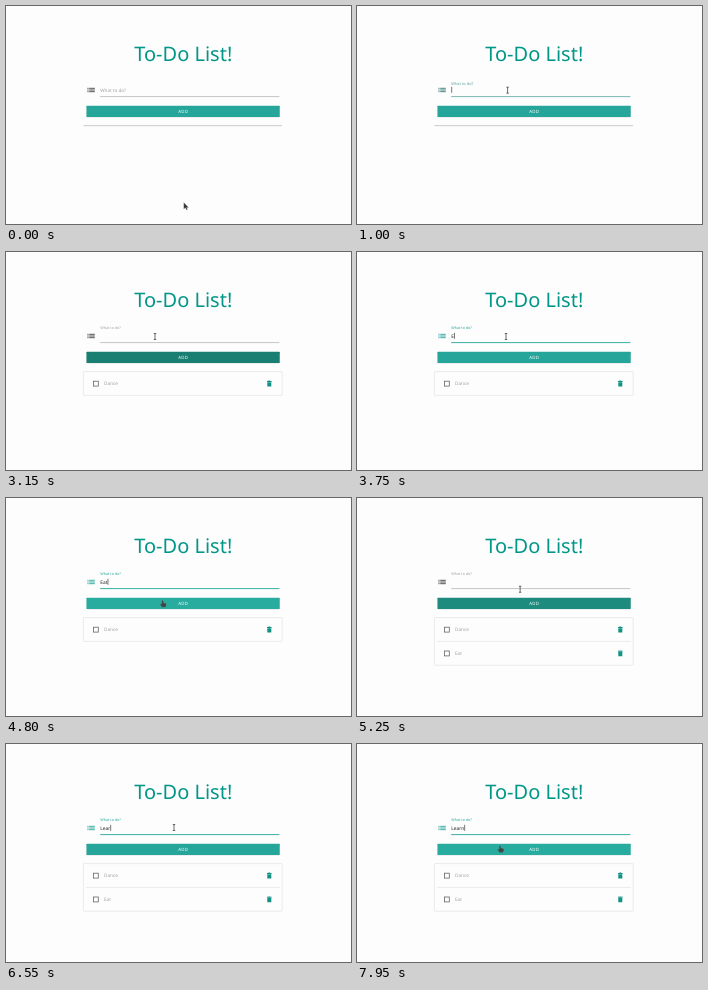
Recreate the animation shown at these times as an HTML page. Size 345 px wide and 218 px high, loop 8000 ms.

```html
<!DOCTYPE html>
<html lang="en">
<head>
<meta charset="utf-8">
<title>To-Do List</title>
<style>
  html, body { margin: 0; width: 100%; height: 100%; overflow: hidden; background: #fdfdfd; }
  svg { display: block; width: 100vw; height: 100vh; }
  text { font-family: "Noto Sans", "Open Sans", sans-serif; font-size: 4.7px; text-rendering: geometricPrecision; white-space: pre; }
</style>
</head>
<body>
<svg viewBox="0 0 345 218">
  <text x="177.3" y="55" text-anchor="middle" fill="#009688" style="font-size:20px">To-Do List!</text>

  <path id="icon" d="M81.4 82.3h7.4m-7.4 1.7h7.4m-7.4 1.7h7.4" stroke-width=".9" stroke-dasharray="1.2 .6 9"/>
  <text id="label" style="font-size:4.6px">What to do?</text>
  <text id="entry" x="94.3" y="85.8" fill="#222" style="font-size:4.85px"></text>
  <rect id="caret" y="80.8" width=".6" height="6" fill="#222"/>
  <path id="line" d="M94.2 90.6H273.4"/>

  <rect x="80.4" y="100" width="193.4" height="11.6" rx="1" opacity=".12"/>
  <rect id="button" x="80.5" y="99.7" width="193.2" height="11.3" rx=".6"/>
  <text x="177.2" y="106.9" text-anchor="middle" fill="#fff" style="font-size:4.4px;letter-spacing:.16px">ADD</text>

  <rect id="list" x="77.4" y="119.6" width="198.8" rx=".4" fill="none" stroke-width=".75"/>
  <g id="items"></g>

  <g id="pointer">
    <path id="arrow" d="M.3 0V6.6L2 5.2 3 7.4 4 7 3.1 4.9H5Z" fill="#333" stroke="#aaa" stroke-width=".3"/>
    <path id="beam" d="M-1.2 -3H1.2M0 -3V3M-1.2 3H1.2" stroke="#444" stroke-width=".8"/>
    <path id="hand" d="M0 0H1V2L4 3V4.5L3.3 6.2H0L-1.7 3.6 0 3.2Z" fill="#3f4544" stroke="#4d5a58" stroke-width=".5" stroke-linejoin="round"/>
  </g>
</svg>
<script>
const LOOP = 8000, STEP = 50, ROW = 23.8;
const TEAL = [38, 166, 154], DARK_TEAL = [24, 125, 113], LIGHT_TEAL = [41, 176, 163];
const ICON = [65, 65, 65], RULE = [182, 182, 182], HINT = [160, 160, 160];

const $ = id => document.getElementById(id);
const set = (id, attrs) => { for (const k in attrs) $(id).setAttribute(k, attrs[k]); };
const show = (node, on) => node.setAttribute("visibility", on ? "visible" : "hidden");

// Each task: field focused, typed at an even pace, then added
const tasks = [
  { text: "Dance", focus: 900, type: 1450, pace: 125, added: 2800 },
  { text: "Eat", focus: 3250, type: 3750, pace: 350, added: 5000 },
  { text: "Learn", focus: 5350, type: 6000, pace: 180, added: 8150, lastKey: 7550 },
];

const START = { x: 177.5, y: 196.5 }, FIELD = { x: 149, y: 84.5 }, ADD = { x: 156, y: 102.7 };
const moves = [
  { at: 200, time: 550, to: FIELD },
  { at: 900, time: 250, to: { x: 151.5, y: 84 } },
  { at: 2350, time: 200, to: ADD },
  { at: 2850, time: 300, to: FIELD },
  { at: 4450, time: 350, to: ADD },
  { at: 5050, time: 550, to: { x: 168, y: 83.5 } },
  { at: 7550, time: 400, to: { x: 142.5, y: 102 } },
];

const lerp = (a, b, k) => a + (b - a) * k;
const mix = (a, b, k) => a.map((v, i) => lerp(v, b[i], k));
const rgb = c => `rgb(${c.map(Math.round)})`;
const ramp = (t, start, time) => {
  const k = Math.min(1, Math.max(0, (t - start) / time));
  return 1 - (1 - k) ** 2;
};
const pulse = (t, from, to) => ramp(t, from, 300) - ramp(t, to, 300);
const total = f => tasks.reduce((sum, task, i) => sum + f(task, i), 0);

tasks.slice(0, 2).forEach((task, i) => {
  $("items").innerHTML += `<g transform="translate(0 ${i * ROW})">
    ${i ? '<path d="M80 119.6H274" stroke="#e6e6e6" stroke-width=".75"/>' : ""}
    <rect x="87.4" y="129.2" width="4.9" height="4.9" fill="none" stroke="#666" stroke-width=".8"/>
    <text x="98" y="133.3" fill="#a2a2a2">${task.text}</text>
    <path fill="#129184" d="M261 129h4.6v.9H261zM262.3 128.6h2v1h-2zM261.3 130.3h4v4.1h-4z"/>
  </g>`;
});

function keyTime(task, i) {
  const isLast = i === task.text.length - 1;
  return isLast && task.lastKey || task.type + i * task.pace;
}

function drawField(t) {
  const focus = total(task => pulse(t, task.focus, task.added - 100));
  const raised = ramp(t, tasks[0].focus, 200);
  set("icon", { stroke: rgb(mix(ICON, TEAL, focus)) });
  set("line", { stroke: rgb(mix(RULE, TEAL, focus)), "stroke-width": lerp(.8, .9, focus) });
  set("label", {
    fill: rgb(mix(HINT, TEAL, focus)),
    transform: `translate(94.3 ${lerp(85.8, 76.7, raised)}) scale(${lerp(1, .8, raised)})`,
  });

  const task = tasks.find(task => t < task.added);
  const keys = [...task.text].map((_, i) => keyTime(task, i)).filter(k => k <= t);
  $("entry").textContent = task.text.slice(0, keys.length);
  const idle = t - Math.max(task.focus + 50, ...keys);
  show($("caret"), idle >= 0 && idle % 1200 < 600 && t < task.added - 100);
  set("caret", { x: 94.5 + (keys.length && $("entry").getComputedTextLength()) });
}

function drawButton(t) {
  const pressed = total(({ added }, i) => pulse(t, added - 50, tasks[i + 1]?.focus ?? LOOP));
  const hover = total(({ added }) => pulse(t, added - 300, added + 110));
  set("button", { fill: rgb(mix(mix(TEAL, DARK_TEAL, pressed), LIGHT_TEAL, hover)) });
}

function drawList(t) {
  const count = total(task => t >= task.added);
  set("list", { height: count * ROW || .1, stroke: count ? "#e6e6e6" : "#cfcfcf" });
  [...$("items").children].forEach((item, i) => show(item, i < count));
}

function drawPointer(t) {
  let { x, y } = START;
  for (const { at, time, to } of moves) {
    const k = ramp(t, at, time);
    x = lerp(x, to.x, k);
    y = lerp(y, to.y, k);
  }
  const kind = y > 76 && y < 93.5 ? "beam" : y > 99.5 && y < 111 ? "hand" : "arrow";
  set("pointer", { transform: `translate(${x} ${y})` });
  for (const id of ["arrow", "beam", "hand"]) show($(id), id === kind);
}

function frame() {
  const t = Math.floor(performance.now() % LOOP / STEP) * STEP;
  drawField(t);
  drawButton(t);
  drawList(t);
  drawPointer(t);
  requestAnimationFrame(frame);
}
frame();
</script>
</body>
</html>
```
